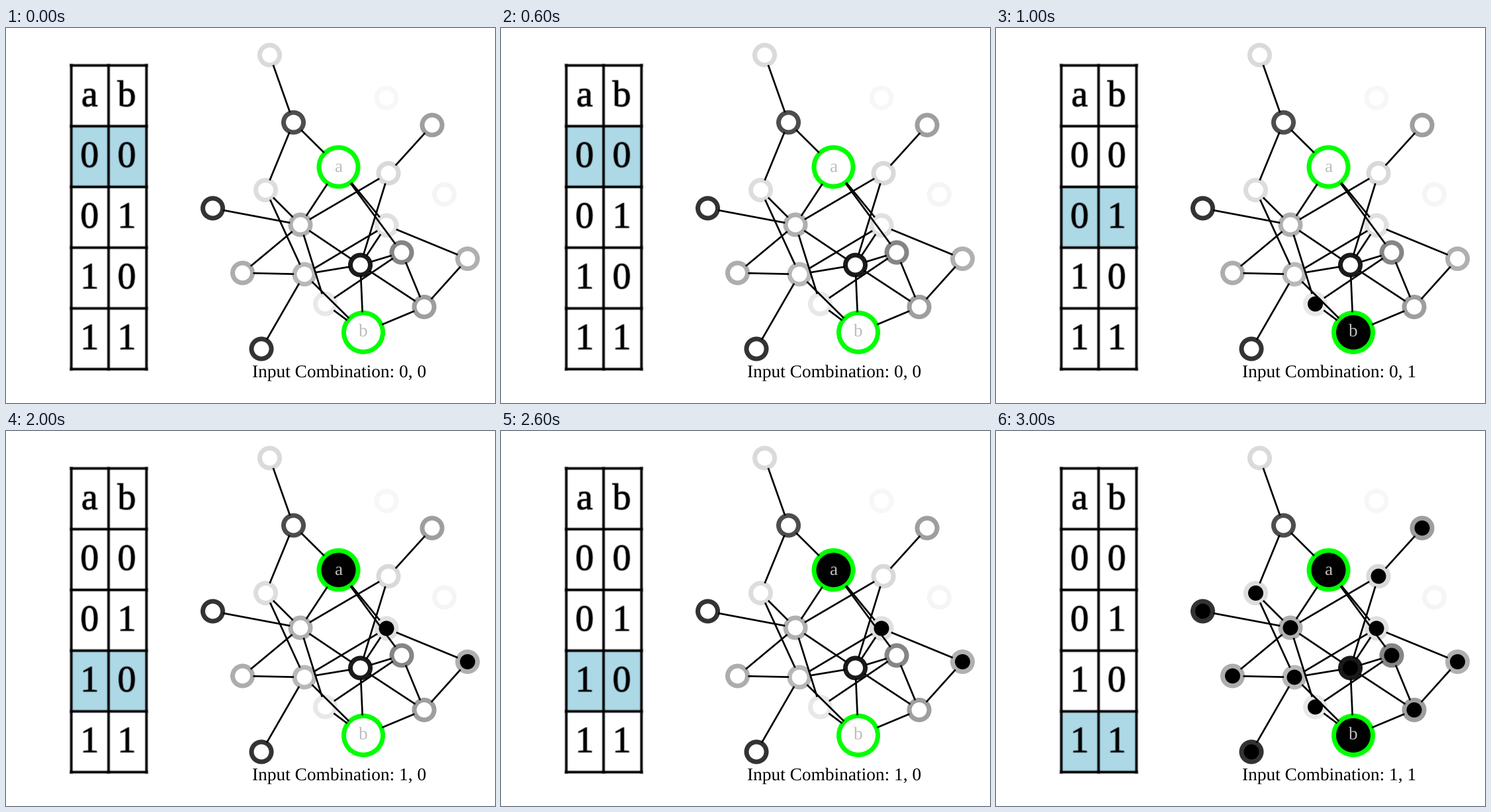
Write a matplotlib script that moves like this. It is 739 px wide and 568 px high and loops after 4000 ms.

```python
import math

import matplotlib.pyplot as plt
from matplotlib.animation import FuncAnimation
from matplotlib.patches import Circle, Rectangle
from matplotlib.patheffects import Normal, Stroke

W, H, DPI = 739, 568, 64
PT = 72 / DPI  # points per pixel
NODE_R, INPUT_R, RING = 15, 29.5, 7

plt.rcParams["font.family"] = "Liberation Serif"
plt.rcParams["text.hinting"] = "none"

# name: (x, y, ring colour)
NODES = {
    "top": (398.5, 41, "#dadada"),
    "dark": (434.5, 143, "#4d4d4d"),
    "lone1": (575, 106, "#f7f7f7"),
    "ne": (644, 147, "#9e9e9e"),
    "n": (578, 220, "#d9d9d9"),
    "lone2": (662.5, 252, "#f5f5f5"),
    "nw": (392.5, 245.5, "#dddddd"),
    "w": (312.5, 273, "#333333"),
    "hub": (445, 298, "#b0b0b0"),
    "mid": (575, 299, "#e0e0e0"),
    "grey": (598, 340, "#858585"),
    "core": (535.5, 359, "#1a1a1a"),
    "e": (697.5, 349.5, "#b0b0b0"),
    "sw": (357.5, 371, "#adadad"),
    "low": (451, 373, "#b8b8b8"),
    "pale": (482.5, 418, "#e8e8e8"),
    "se": (632, 422.5, "#9e9e9e"),
    "s": (386, 486, "#333333"),
    "a": (502.5, 210.5, "#00ff00"),
    "b": (540, 461, "#00ff00"),
}
EDGES = """top-dark dark-nw dark-a nw-hub nw-low w-hub a-hub a-mid a-grey ne-n
n-hub n-core hub-sw hub-core hub-pale mid-low mid-core mid-e sw-low low-core
low-s low-b core-grey core-se core-b grey-pale grey-se pale-b se-e se-b""".split()
INPUTS = [(0, 0), (0, 1), (1, 0), (1, 1)]
SILENT = {"top", "dark", "lone1", "lone2"}
ACTIVE = [set(), {"b", "pale"}, {"a", "mid", "e"}, set(NODES) - SILENT]

COLUMNS = (98.7, 155, 212.3)
ROW_TOP, ROW_H = 56.7, 92

fig = plt.figure(figsize=(W / DPI, H / DPI), dpi=DPI, facecolor="white")
ax = fig.add_axes([0, 0, 1, 1])
ax.set(xlim=(0, W), ylim=(H, 0))
ax.axis("off")


def line(x0, y0, x1, y1, width, alpha=1, cap="butt"):
    ax.plot([x0, x1], [y0, y1], color="black", alpha=alpha, lw=width * PT,
            zorder=3, solid_capstyle=cap, snap=False)


def label(x, y, text, size, color="black", align="center"):
    return ax.text(x, y, text, size=size * PT, color=color, ha=align,
                   va="baseline", zorder=6)


def radius(name):
    return INPUT_R if name in "ab" else NODE_R


def draw_table():
    left, right = COLUMNS[0], COLUMNS[-1]
    bottom = ROW_TOP + 5 * ROW_H
    # Stacked translucent strokes give the table its soft edges.
    for width, alpha in ((6, 0.15), (4.4, 0.45), (2.8, 1)):
        for x in COLUMNS:
            line(x, ROW_TOP, x, bottom, width, alpha, "projecting")
        for row in range(6):
            y = ROW_TOP + row * ROW_H
            line(left, y, right, y, width, alpha, "projecting")
    soft = [Stroke(linewidth=3 * PT, foreground="black", alpha=0.15),
            Stroke(linewidth=1.4 * PT, foreground="black", alpha=0.4),
            Normal()]
    for row, cells in enumerate([("a", "b"), *INPUTS]):
        for x, cell in zip((126.3, 182.5), cells):
            text = label(x, 118.4 + row * ROW_H, str(cell), 56)
            text.set_path_effects(soft)


def draw_edge(start, end):
    (x0, y0, _), (x1, y1, _) = NODES[start], NODES[end]
    length = math.hypot(x1 - x0, y1 - y0)
    ux, uy = (x1 - x0) / length, (y1 - y0) / length
    r0, r1 = radius(start) + 1, radius(end) + 1
    line(x0 + ux * r0, y0 + uy * r0, x1 - ux * r1, y1 - uy * r1, 2.7)


def draw_node(name):
    x, y, color = NODES[name]
    disc = Circle((x, y), radius(name), ec=color, fc="white", lw=RING * PT,
                  zorder=2)
    ax.add_patch(disc)
    if name in "ab":
        label(x, y + 6.8, name, 27.3, "#bebebe")
    return disc


draw_table()
highlight = ax.add_patch(Rectangle((COLUMNS[0], ROW_TOP), COLUMNS[-1] - COLUMNS[0],
                                   ROW_H, fc="#add8e6", ec="none", zorder=1))
for edge in EDGES:
    draw_edge(*edge.split("-"))
discs = {name: draw_node(name) for name in NODES}
caption = label(372, 529, "", 27.35, align="left")


def update(step):
    a, b = INPUTS[step]
    highlight.set_y(ROW_TOP + (step + 1) * ROW_H)
    caption.set_text(f"Input Combination: {a}, {b}")
    for name, disc in discs.items():
        disc.set_facecolor("black" if name in ACTIVE[step] else "white")
    return [highlight, caption, *discs.values()]


anim = FuncAnimation(fig, update, frames=len(INPUTS), interval=1000,
                     repeat=True, repeat_delay=0)
plt.show()
```
